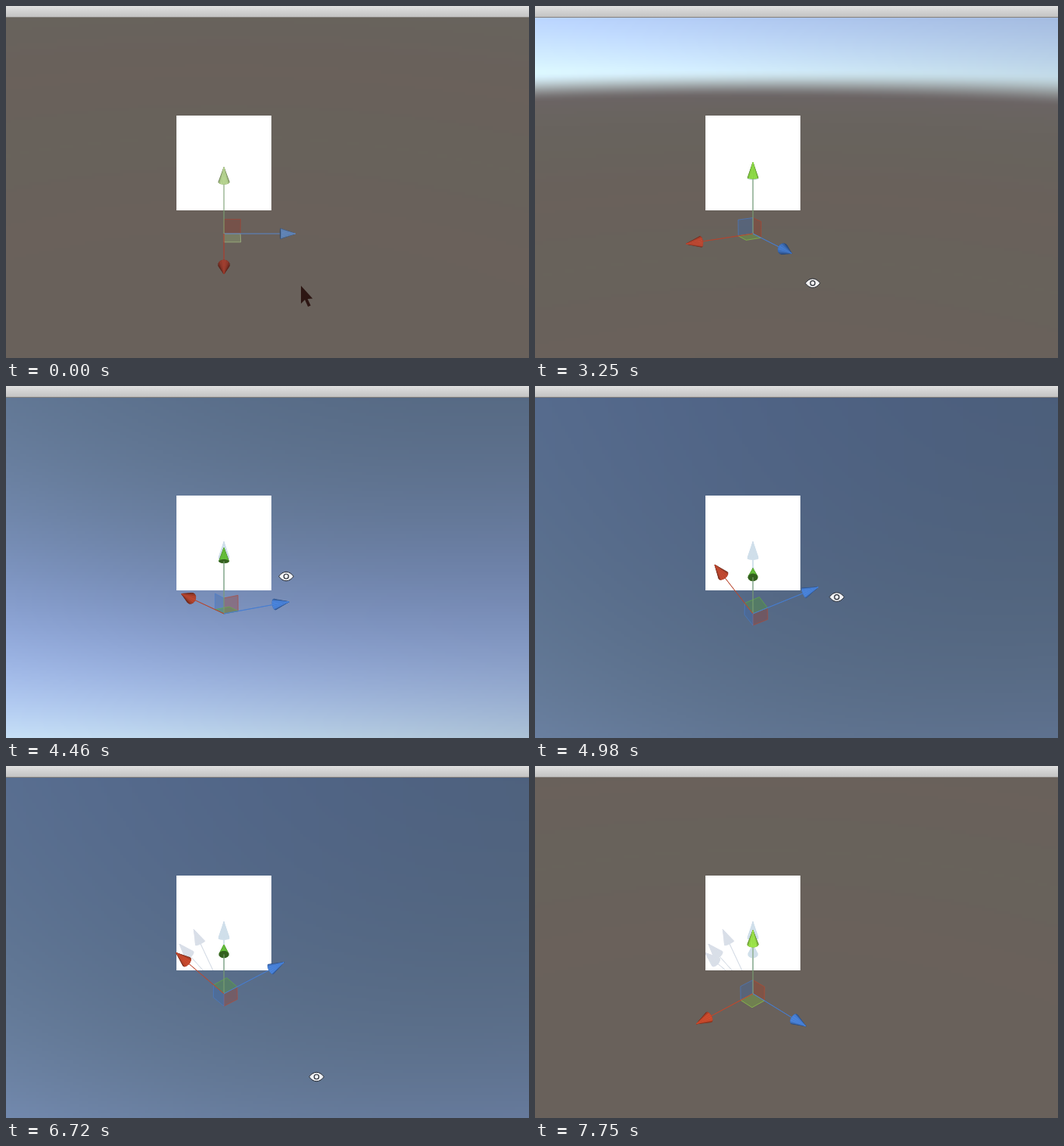
Animation, 672 px wide and 453 px high, one loop 8270 ms. Source, as an HTML page with a canvas:

```html
<!DOCTYPE html>
<html lang="en">
<head>
<meta charset="utf-8">
<title>Orbiting a scene view</title>
<style>
html, body { margin: 0; width: 100%; height: 100%; overflow: hidden; background: #69625d; }
canvas { display: block; }
</style>
</head>
<body>
<canvas id="stage" width="672" height="453"></canvas>
<script>
const ctx = document.getElementById('stage').getContext('2d');
const LOOP = 8270, STEP = 172, LAST = 45;
const CX = 280, CY = 293, FOCAL = 640, AXIS = 92, CELL = 4, TOP = 13;
const RAD = Math.PI / 180;

// [step, yaw, pitch] in degrees; positive pitch looks down
const ORBIT = [
  [0, 0, 30], [14, 0, 30], [22, 98, 8], [26, 32, -17], [34, 25, -95], [39, 38, -42], [45, 47, 35]
];
// [step, x, y]
const POINTER = [
  [0, 379, 360], [3, 451, 288], [7, 251, 370], [12, 312, 391], [22, 376, 342],
  [26, 360, 245], [34, 434, 316], [39, 399, 400], [45, 365, 437]
];
// [step, axis] of arrows that leave pale paint on the white square
const TRACES = [[18, 1], [23, 1], [34, 0], [38, 0], [39, 0], [39, 1]];

const clamp = (v, a = 0, b = 1) => Math.max(a, Math.min(b, v));
const mix = (a, b, k) => a.map((v, i) => v + (b[i] - v) * k);
const smooth = (a, b, v) => { const k = clamp((v - a) / (b - a)); return k * k * (3 - 2 * k); };
const rgb = (c, k = 1, a = 1) => `rgba(${c.map(v => Math.round(v * k)).join()},${a})`;
const unit = (i, k = 1) => [0, 1, 2].map(j => j === i ? k : 0);
const add = (...vs) => [0, 1, 2].map(j => vs.reduce((s, v) => s + v[j], 0));

function sample(keys, at) {
  const i = Math.max(1, keys.findIndex(k => k[0] >= at));
  const [a, b] = [keys[i - 1], keys[i]];
  return mix(a, b, (at - a[0]) / (b[0] - a[0])).slice(1);
}

// Projects [red, green, blue] axis coordinates to [x, y, depth]
function camera([yaw, pitch]) {
  const [s, c] = [Math.sin(yaw * RAD), Math.cos(yaw * RAD)];
  const [sp, cp] = [Math.sin(pitch * RAD), Math.cos(pitch * RAD)];
  return ([x, y, z]) => {
    const near = x * c + z * s, depth = y * sp + near * cp;
    const k = AXIS / (1 - .13 * depth);
    return [CX + (z * c - x * s) * k, CY - (y * cp - near * sp) * k, depth];
  };
}

function paint(fill, stroke, width = 1) {
  if (fill) { ctx.fillStyle = fill; ctx.fill(); }
  if (stroke) { ctx.strokeStyle = stroke; ctx.lineWidth = width; ctx.stroke(); }
}

function shape(points, ...style) {
  ctx.beginPath();
  points.forEach(p => ctx.lineTo(p[0], p[1]));
  ctx.closePath();
  paint(...style);
}

function disc(x, y, r, ...style) {
  ctx.beginPath();
  ctx.arc(x, y, r, 0, 7);
  paint(...style);
}

const line = (a, b, color, width) => shape([a, b], null, color, width);

function skyColor(e, light) {
  const high = Math.max(e, 0), falloff = Math.exp(-high / 17), blue = Math.exp(-((high / 23) ** 2));
  return [78 + 132 * falloff, 98 + 137 * falloff, 134 + 101 * blue].map(v => v * light);
}

function groundColor(e) {
  const wave = Math.cos((Math.max(e, -26) + 12) * .45), haze = Math.exp(Math.min(e, 0) / 3);
  return [104.5 + wave + 3 * haze, 97.5 - wave + 4 * haze, 91 + 12 * haze];
}

const skyCanvas = document.createElement('canvas');
skyCanvas.width = 168;
skyCanvas.height = 110;
const skyCtx = skyCanvas.getContext('2d');
const pixels = skyCtx.createImageData(168, 110);

function drawSky(yaw, pitch) {
  const up = -pitch * RAD;
  for (let j = 0, o = 0; j < 110; j++) {
    for (let i = 0; i < 168; i++, o += 4) {
      const x = (i + .5) * CELL - CX, y = CY - TOP - (j + .5) * CELL;
      const sine = (y * Math.cos(up) + FOCAL * Math.sin(up)) / Math.hypot(x, y, FOCAL);
      const e = Math.asin(clamp(sine, -1, 1)) / RAD + .7 * (x / 400) ** 2;
      const light = 1 + (yaw - 32 - Math.atan(x / FOCAL) / RAD) * .0025;
      const color = mix(groundColor(e), skyColor(e, light), smooth(-1, 2, e));
      pixels.data.set([...color, 255], o);
    }
  }
  skyCtx.putImageData(pixels, 0, 0);
  ctx.drawImage(skyCanvas, 0, TOP, 672, 440);
}

function drawArrow(view, axis, color, shaft, flat) {
  const tip = view(unit(axis)), center = unit(axis, .79), middle = view(center);
  const ring = Array.from({ length: 14 }, (_, i) => {
    const a = i / 7 * Math.PI;
    return view(add(center, unit((axis + 1) % 3, .073 * Math.cos(a)), unit((axis + 2) % 3, .073 * Math.sin(a))));
  });
  const facets = ring.map((p, i) => {
    const q = ring[(i + 1) % 14];
    return { points: [tip, p, q], z: (p[2] + q[2]) / 2 - middle[2] };
  }).sort((a, b) => a.z - b.z);
  const parts = [
    () => line([CX, CY], middle, shaft),
    () => shape(ring, rgb(color, flat ? 1 : .5)),
    () => facets.forEach(f => {
      const c = rgb(color, flat ? 1 : .55 + .45 * clamp(f.z / .045));
      shape(f.points, c, c, .4);
    })
  ];
  if (tip[2] < 0) parts.reverse();
  parts.forEach(part => part());
}

function drawGizmo(view, colors) {
  const depth = [0, 1, 2].map(i => view(unit(i))[2]);
  const side = depth.map((z, i) => z < (i === 1 ? -.35 : -.01) ? -.23 : .23);
  [0, 2, 1].forEach(i => {
    if (Math.abs(depth[i]) < .2) return;
    const [j, k] = [(i + 1) % 3, (i + 2) % 3];
    const a = unit(j, side[j]), b = unit(k, side[k]);
    shape([[0, 0, 0], a, add(a, b), b].map(view), rgb(colors[i], .8, .36), rgb(colors[i], .95, .6));
  });
  [0, 1, 2].sort((a, b) => depth[a] - depth[b]).forEach(i => {
    const facing = Math.abs(depth[i]);
    if (facing > .99) return;
    if (facing > .965) {
      const p = view(unit(i));
      line([CX, CY], p, 'rgba(80,72,72,.4)');
      disc(p[0], p[1], 7, '#544e4d');
    } else {
      drawArrow(view, i, colors[i], i === 1 ? 'rgba(125,160,115,.65)' : rgb(colors[i], .95, .8));
    }
  });
}

function drawSun(x, y) {
  for (let i = 0; i < 12; i++) {
    const r = i % 3 ? 13.5 : 15, [c, s] = [Math.cos(i * Math.PI / 6), Math.sin(i * Math.PI / 6)];
    line([x + c * 9, y + s * 9], [x + c * r, y + s * r], '#fffdf2', 2);
  }
  disc(x, y, 6.8, '#fffdf2', 'rgba(50,60,80,.8)');
}

function drawArrowCursor(x, y) {
  const outline = [[0, 0], [0, 23], [5, 18], [9, 27], [12.5, 25.5], [8.5, 17], [15, 16.5]];
  shape(outline.map(([a, b]) => [x + a, y + b]), '#2d1613');
}

function drawEye(x, y) {
  ctx.beginPath();
  ctx.moveTo(x - 9.5, y);
  ctx.bezierCurveTo(x - 4, y - 7.7, x + 4, y - 7.7, x + 9.5, y);
  ctx.bezierCurveTo(x + 4, y + 7.7, x - 4, y + 7.7, x - 9.5, y);
  paint('rgba(255,255,255,.9)', '#252932');
  disc(x, y, 3, null, '#252932', 1.2);
}

function drawSquare(step) {
  ctx.save();
  ctx.beginPath();
  ctx.rect(219, 141, 122, 122);
  paint('#fff');
  ctx.clip();
  TRACES.filter(([at]) => at < step).forEach(([at, axis]) => {
    const tint = axis ? [208, 223, 234] : [217, 223, 232];
    drawArrow(camera(sample(ORBIT, at)), axis, tint, rgb(tint), true);
  });
  ctx.restore();
}

function drawBar() {
  const g = ctx.createLinearGradient(0, 0, 0, 14);
  g.addColorStop(0, '#e0e0e0');
  g.addColorStop(1, '#c3c3c3');
  ctx.fillStyle = g;
  ctx.fillRect(0, 0, 672, 14);
  ctx.fillStyle = '#85817d';
  ctx.fillRect(0, 14, 672, 1);
}

function draw(step) {
  const pose = sample(ORBIT, step), pointer = sample(POINTER, step);
  const [yaw, pitch] = pose, down = smooth(-20, 35, pitch);
  const colors = [
    mix([176, 70, 54], [206, 76, 46], step / LAST),
    step < 15 ? [184, 214, 146] : mix([102, 192, 60], [158, 230, 76], down),
    step < 9 ? [98, 134, 184] : [74, 132, 220]
  ];
  drawSky(yaw, pitch);
  drawSun(CX + 19, CY - 860 * Math.cos(pitch * RAD));
  drawSquare(step);
  drawGizmo(camera(pose), colors);
  if (step < 10) drawArrowCursor(...pointer);
  else if (step < LAST) drawEye(...pointer);
  drawBar();
}

let shown = -1;
const start = performance.now();
function tick() {
  const time = (performance.now() - start) % LOOP;
  const step = Math.min(LAST, Math.floor((time + 21) / STEP));
  if (step !== shown) draw(shown = step);
  requestAnimationFrame(tick);
}
tick();
</script>
</body>
</html>
```
